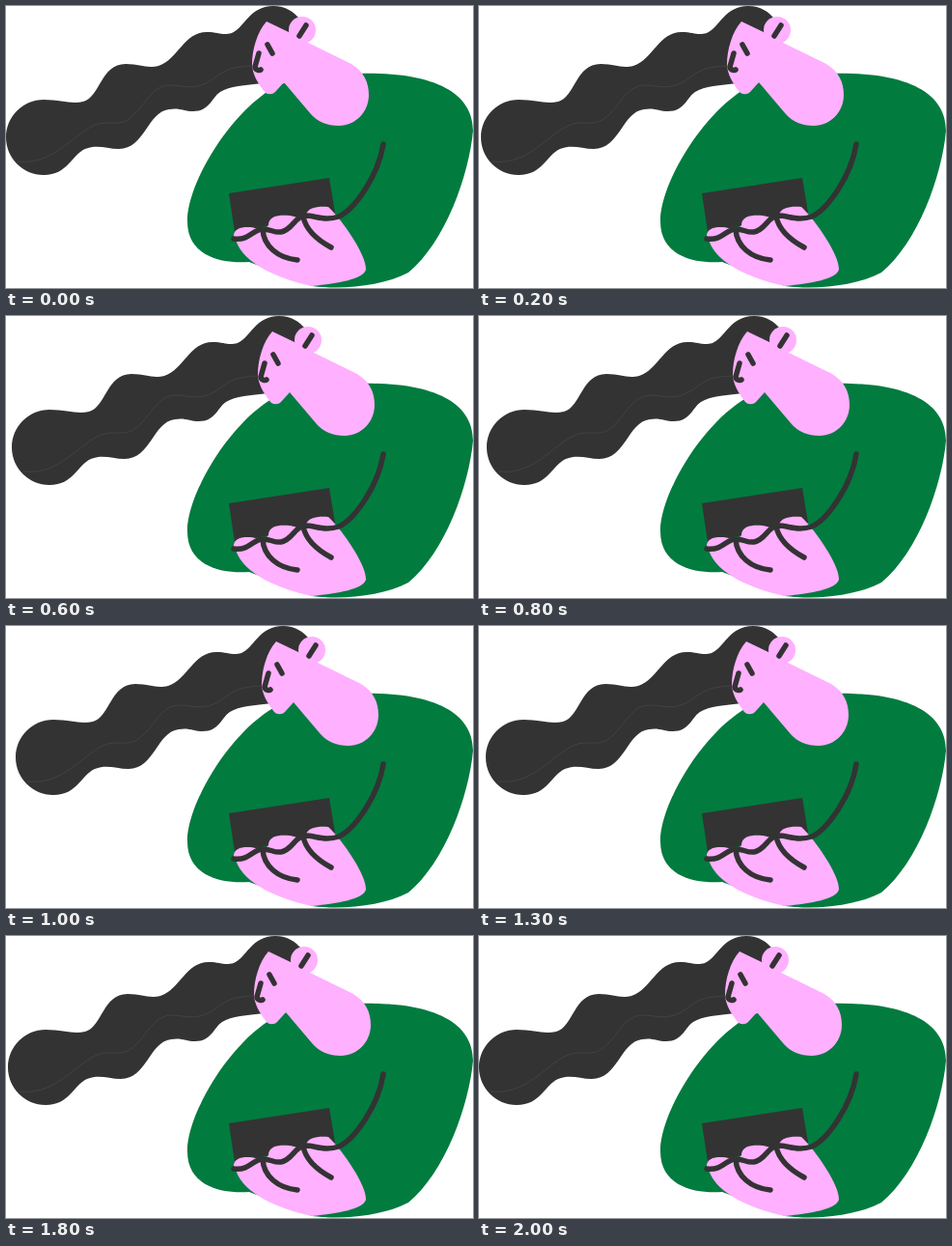
Recreate the animation shown at these times as an HTML page. Size 484 by 292 pixels, loop 2.1 s.

```html
<!DOCTYPE html>
<html lang="en">
<head>
<meta charset="utf-8">
<title>Leaning reader</title>
<style>
  html, body { margin: 0; width: 100%; height: 100%; overflow: hidden; background: #fff; }
  svg { display: block; width: 484px; height: 292px; }
  .dark { fill: #333; }
  .skin { fill: #ffb0ff; }
  .top { fill: #027b3f; }
  .line { fill: none; stroke: #333; stroke-width: 5.5; stroke-linecap: round; stroke-linejoin: round; }
  .seam { fill: none; stroke: #4c4c4c; stroke-width: .6; }
</style>
</head>
<body>
<svg viewBox="0 0 484 292">
  <path class="top" d="M365 70 C440 68 484 88 484 129 C480 175 455 245 417 276
    C390 290 350 294 317 290 L252 265 C225 267 188 260 188 223 C188 185 228 117 272 88 C300 70 335 70 365 70Z"/>

  <g id="head">
    <path class="dark" d="M0 136 C0 114.5 17.5 97 39 97 C58 97 67 102 80 99 C98 94 98 60 124 60
      C140 60 145 65 158 62 C179 55 184 27 208 27 C221 27 224 31 234 28 C247 23 252 0 277 0
      C290 0 298 6 304 13 L294 32 L270 60 L266 80 C247 82 232 83 222 89 C213 95 211 109 194 109
      C184 109 180 105 169 107 C146 110 144 148 117 148 C104 148 95 143 82 148 C68 154 64 175 39 175
      C17.5 175 0 157.5 0 136Z"/>
    <path class="seam" d="M12 161 C55 166 75 122 102 121 C118 121 123 123 135 110
      C147 97 153 83 169 82 C184 82 193 88 211 78 C225 69 227 63 256 62"/>
    <path class="skin" d="M270 16 L295 28 L313 38 L358 60 C371 68 376 79 376 92 C376 110 362 124 345 124
      C333 124 323 120 316 112 L288 79 L279 89 C276 92 271 92 268 89
      C261 80 255 70 255 60 C255 46 260 27 270 16Z"/>
    <circle class="skin" cx="307" cy="25" r="14"/>
    <path class="line" d="M311 20 L304 31 M271 40 L276 49 M262 49 L258 63 C259 67 263 67 264 66"/>
  </g>

  <path class="dark" d="M231 194 L335 178 L341 214 L237 234Z"/>
  <path class="skin" d="M236 240 C235 231 243 229 250 229 C258 229 262 231 266 233 L272 227
    C272 217 284 216 294 217 C301 218 304 220 307 220 L311 216 C313 208 325 207 334 208
    C350 223 374 259 373 273 C370 283 345 287 317 290 C285 283 246 268 238 242Z"/>
  <path class="line" d="M236 241 C253 243 256 231 266 231 C275 231 277 235 285 234
    C297 232 300 217 310 217 C321 217 330 223 345 218 C362 210 386 175 391 143
    M266 231 C267 249 282 261 302 263 M308 218 C311 233 324 243 337 250"/>
</svg>
<script>
  const head = document.getElementById('head');
  const LOOP = 2100, STEP = 100, REACH = 10;

  // The head slides one pixel per step, out and back.
  function draw(now) {
    const step = Math.floor(now % LOOP / STEP);
    head.setAttribute('transform', `translate(${REACH - Math.abs(step - REACH)} 0)`);
    requestAnimationFrame(() => draw(performance.now()));
  }
  draw(performance.now());
</script>
</body>
</html>
```
